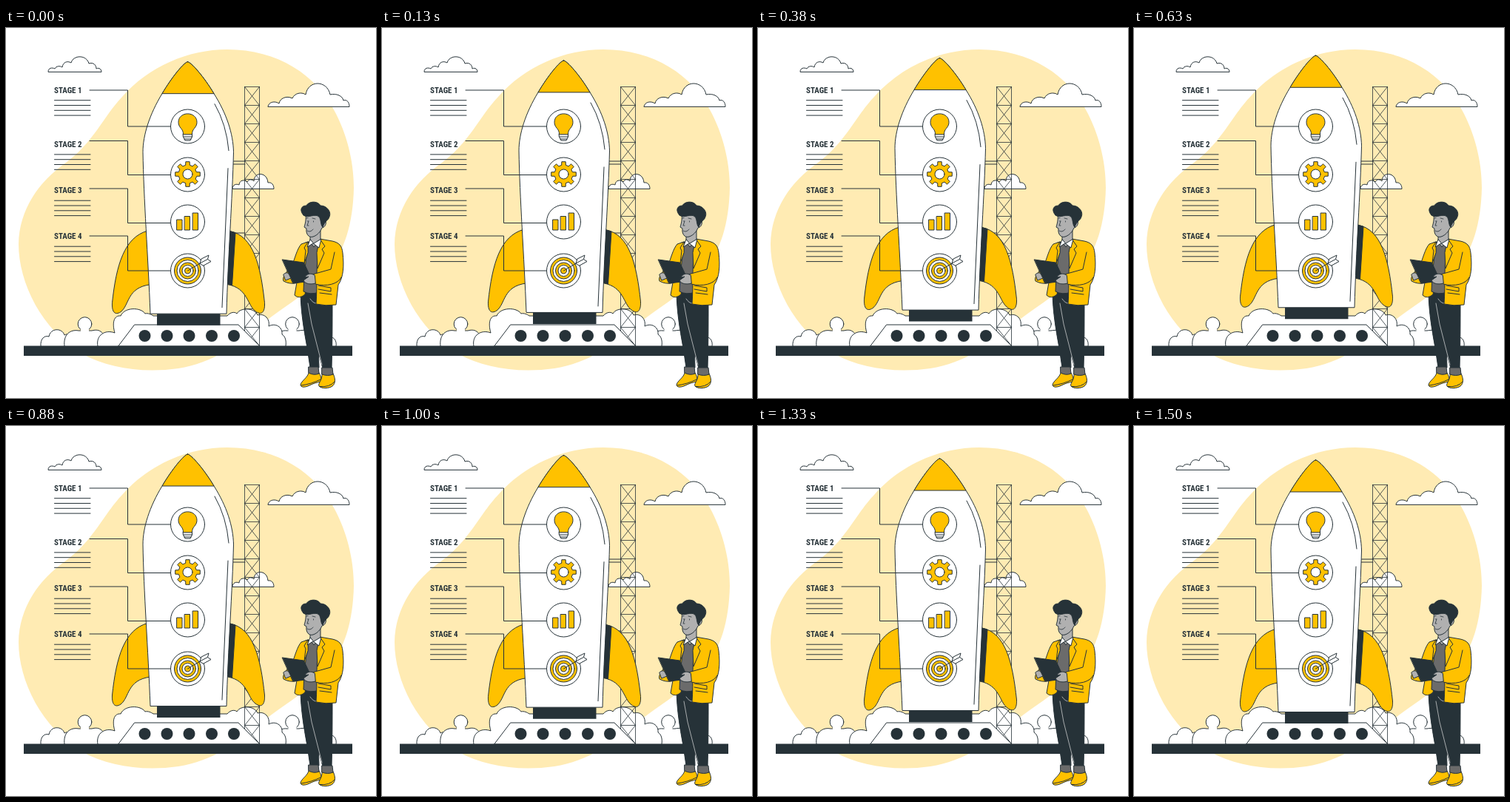
Recreate the animation shown at these times as an HTML page. Size 500 by 500 pixels, loop 1.54 s.

```html
<!DOCTYPE html>
<html lang="en">
<head>
<meta charset="utf-8">
<title>Rocket stages</title>
<style>
html, body { margin: 0; width: 100%; height: 100%; overflow: hidden; background: #fff; }
svg { display: block; width: 100vw; height: 100vh; }
.ln { fill: none; stroke: #263238; stroke-width: 1; stroke-linecap: round; stroke-linejoin: round; }
.w { fill: #fff; }
.y { fill: #ffc100; }
.d { fill: #263238; }
.g { fill: #6b6b6b; }
.skin { fill: #b0b0b0; }
.flat { stroke: none; }
.thin { stroke-width: .8; }
.pale { stroke: #e0e0e0; stroke-width: .7; }
.label { font-weight: 700; font-stretch: 62.5%; fill: #263238; }
</style>
</head>
<body>
<svg viewBox="0 0 500 500" xmlns="http://www.w3.org/2000/svg">
  <path fill="#ffebb3" d="M17 292C18 245 44 208 81 182C118 155 132 119 157 93C193 52 246 29 299 29C367 29 420 63 446 116C464 152 470 187 470 216C469 263 458 303 432 331C407 360 374 377 349 398C315 428 278 453 233 460C184 467 137 459 104 441C48 408 17 344 17 292Z"/>

  <!-- sky -->
  <g class="ln">
    <path class="w" d="M57 59C57 54 62 53 66 55C68 51 73 51 76 53C77 46 83 44 88 47C91 36 109 36 112 48C118 46 122 50 122 55C126 53 129 56 129 59Z"/>
    <path class="w" d="M354 106C355 100 363 98 369 102C370 95 379 91 387 95C390 88 399 86 405 90C408 70 434 70 438 90C447 88 455 92 456 98C461 96 464 101 464 106Z"/>
    <path class="w" d="M306 217C306 212 311 210 315 212C315 206 322 204 326 208C329 203 333 205 335 207C335 194 353 194 354 209C359 208 362 212 362 217Z"/>
  </g>

  <!-- steam -->
  <g class="ln">
    <path class="w" d="M47 430C46 420 52 415 58 417C60 405 76 405 79 415C86 411 93 416 95 430Z"/>
    <path class="w" d="M79 430C77 414 87 407 98 409H116C127 406 134 411 136 430Z"/>
    <circle class="w" cx="106.500" cy="400" r="9.300"/>
    <path class="w flat" d="M101 405h11v8h-11z"/>
    <path class="w" d="M365 430C364 415 370 408 379 409H396C411 406 419 415 420 430Z"/>
    <circle class="w" cx="387" cy="400" r="9.300"/>
    <path class="w flat" d="M381.500 405h11v8h-11z"/>
    <path class="w" d="M425 430C424 418 433 412 440 418C445 419 447 425 446 430Z"/>
    <path class="w" d="M124 430C121 415 134 407 147 412C143 398 146 388 155 389C160 377 182 377 188 386C192 385 196 387 199 389H299C303 384 309 383 312 386C317 377 336 378 340 388C350 385 357 394 355 403C364 398 374 404 373 414C378 417 379 424 378 430Z"/>
  </g>

  <g class="ln">
    <path id="tower" class="thin"/>
    <path d="M306 180H323M306 184H323M303 277H323"/>
  </g>

  <!-- launch pad -->
  <g class="ln"><path class="w" d="M174 401H314L343 430H152Z"/></g>
  <g id="bolts" class="d"></g>
  <path class="d" d="M24 429.500H468V443H24Z"/>

  <g id="rocket">
    <path class="d" d="M204 386H289.500V402H204Z"/>
    <g class="ln">
      <path class="y" d="M191 274.500C160 283 149 320 143.500 372C143 384 147 389 155 384C167 375 163 351 195 347Z"/>
      <path class="y" d="M303 275C334 281 344 320 349.500 372C350 385 345 389 337 383C326 375 327 352 300 347Z"/>
      <path class="d" d="M303 275L310 277L305.500 348L299 346Z"/>
      <path class="w" d="M245.500 46C241 46 224 67 211 89C194 117 185 145 185 168C186 230 192 310 195 386.500H298C300 310 306 230 307.500 168C307 143 298 116 281 89C268 67 250 46 245.500 46Z"/>
      <path class="y" d="M245.500 46C241 46 224 67 211 89H281C268 67 250 46 245.500 46Z"/>
      <path d="M282 103Q298 131 301 166M300 190L292 378"/>
    </g>
  </g>

  <g id="stages"></g>

  <!-- stage icons -->
  <g class="ln">
    <path class="w" d="M239.500 143H251.500V147L249 152H242L239.500 147Z"/>
    <path d="M239.500 147H251.500M241 150H250"/>
    <path class="y" d="M239.500 143.500C240 136 233 135 233 127.500C233 112 258 112 258 127.500C258 135 251 136 251.500 143.500Z"/>
    <path id="gear" class="y"/>
    <circle class="w" cx="245.500" cy="197.500" r="6.500"/>
    <path class="y" d="M231 259H238V273H231ZM241.500 254.500H248.500V273H241.500ZM252.500 250H259.500V273H252.500Z"/>
    <g id="rings"></g>
    <path d="M245.500 328L264 317"/>
    <path class="w" d="M262 318L264 312L274 307L272.500 312.500L277 315.500L267 321Z"/>
    <path d="M262 318L272.500 312.500"/>
  </g>

  <!-- man -->
  <g class="ln">
    <path class="y" d="M409 466C408 472 399 477 398 482C398 486 404 486 410 483C416 480 420 479 425 478C427 474 425 469 423 466Z"/>
    <path class="y" d="M427 467C428 476 421 480 423 484C427 488 437 487 441 484C446 480 445 473 442 467Z"/>
    <path d="M399 483Q413 481 425 475M424 484.500Q437 486 444 478"/>
    <path class="d" d="M398 354C398 385 404 415 407 432L411 459H423L422 425L430 358Z"/>
    <path class="d" d="M404 357L412 400L428 460H440C441 428 441 394 441 362Z"/>
    <path class="pale" d="M408 372L413 400L427 455M411 366Q415 372 419 372"/>
    <path class="g" d="M409 458H422L423 467Q416 470 409 466ZM427 459H441L442 468Q435 471 427 468Z"/>
    <path class="y" d="M394 338L390 361Q396 367 404 360L408 338Z"/>
    <path class="g" d="M405 290L402 356Q411 361 423 357L425 290Z"/>
    <path class="y" d="M424 285L441 288C450 290 454 294 455 304C457 322 456 337 449 347L446 374Q432 376 419 373C421 346 418 319 424 285Z"/>
    <path class="y" d="M408 289L399 292C393 299 391 310 386 322C378 330 373 337 375 342C386 348 398 345 402 338C405 322 406 306 408 289Z"/>
    <path class="y" d="M424 285L431 295L427 299L430 304L421 325L420 304ZM408 289L403 297L405 301L403 318L408 304Z"/>
    <path class="skin" d="M411 278L411 289L416 296L425 285V272Z"/>
    <path class="w" d="M411 286L407 296L415 291L423 297L426 285L416 291Z"/>
    <path class="skin" d="M405 250C406 260 404 265 403 269L406 271C405 278 409 284 415 282C421 280 425 275 427 270C433 269 434 260 430 258C427 253 412 247 405 250Z"/>
    <path class="d" d="M402 253C396 246 399 240 406 240C409 234 421 233 425 240C434 240 440 249 437 255C436 260 431 260 428 269C425 267 426 259 423 255C417 250 408 258 402 253Z"/>
    <path class="thin" d="M407 274Q411 277 415 272M406 257L408 256.500M414 257L418 258M409 261L407 267H409"/>
    <path class="thin" d="M408 260.500v1M415.500 261v1"/>
    <path class="y" d="M444 303L439 326L414 333L418 346C433 350 449 346 453 337"/>
    <path class="d" d="M373.500 313L402.500 317L414 342L388 345Z"/>
    <path class="skin" d="M417 334C411 330 406 333 404 337L409 336L402 341C404 346 412 347 418 345ZM375 333Q379 329 382 332L385 338L378 341Z"/>
    <path d="M422 348L439 351V356L422 353M424 358L440 360"/>
  </g>
</svg>
<script>
const NS = "http://www.w3.org/2000/svg";
const PERIOD = 1540;
const FONTS = ["Noto Sans", "Roboto Condensed", "Roboto", "Open Sans"];
const byId = id => document.getElementById(id);

function add(parent, tag, attrs) {
  const el = document.createElementNS(NS, tag);
  for (const k in attrs) el.setAttribute(k, attrs[k]);
  return parent.appendChild(el);
}

function drawTower() {
  const left = 322.500, right = 342.500, top = 79.500, step = 25;
  let d = `M${left} ${top}V430M${right} ${top}V430`;
  for (let y = top; y < 429; y += step) {
    const b = y + step;
    d += `M${left} ${y}H${right}M${left} ${y}L${right} ${b}M${right} ${y}L${left} ${b}`;
  }
  byId("tower").setAttribute("d", d);
}

function drawGear(cx, cy, teeth) {
  const pts = [], pitch = 2 * Math.PI / teeth;
  const profile = [[-0.290, 12.500], [-0.200, 17], [0.200, 17], [0.290, 12.500]];
  for (let i = 0; i < teeth; i++) {
    for (const [off, r] of profile) {
      const a = (i + off) * pitch;
      pts.push((cx + r * Math.cos(a)).toFixed(2) + " " + (cy + r * Math.sin(a)).toFixed(2));
    }
  }
  byId("gear").setAttribute("d", "M" + pts.join("L") + "Z");
}

// Sets the label in the narrowest available face, at the size that suits the column
function fitLabel(text) {
  const width = font => {
    text.style.font = `700 14px "${font}", sans-serif`;
    text.style.fontStretch = "62.5%";
    return text.getComputedTextLength();
  };
  const font = FONTS.reduce((a, b) => width(b) < width(a) ? b : a);
  const size = Math.min(14, 14 * 37.500 / width(font));
  text.style.fontSize = size + "px";
  return size;
}

function drawStage(n, textY, lineY, iconY, joinY) {
  const g = byId("stages");
  const text = add(g, "text", { x: 65, class: "label" });
  text.textContent = "STAGE " + n;
  text.setAttribute("y", textY + fitLabel(text) * 0.360);

  let d = `M113 ${lineY}H164.500V${joinY}H222`;
  for (let i = 0; i < 4; i++) d += `M65.500 ${textY + 13.700 + i * 6.800}H114`;
  add(g, "path", { d, class: "ln" });
  add(g, "circle", { cx: 245.500, cy: iconY, r: 23, class: "ln", style: "fill:#fff" });
}

drawTower();
drawGear(245.500, 197.500, 8);
[187.500, 217.500, 247.500, 278, 308].forEach(cx => add(byId("bolts"), "circle", { cx, cy: 416, r: 8 }));
[18, 14.500, 11, 7.500, 4].forEach((r, i) =>
  add(byId("rings"), "circle", { cx: 245.500, cy: 328, r, class: i % 2 ? "w" : "y" }));
drawStage(1, 84, 84, 133, 133);
drawStage(2, 157.200, 152.500, 198, 198.500);
drawStage(3, 219.500, 217, 262, 263.500);
drawStage(4, 281.500, 281, 328, 328);

// Steady rise of 10 px and steady return
function render(t) {
  const lift = Math.max(0, 10 * (1 - Math.abs(t + 25 - 750) / 750));
  byId("rocket").setAttribute("transform", `translate(0 ${-lift.toFixed(2)})`);
}

let start;
function tick(now) {
  if (start === undefined) start = now;
  render((now - start) % PERIOD);
  requestAnimationFrame(tick);
}
render(0);
requestAnimationFrame(tick);
</script>
</body>
</html>
```
